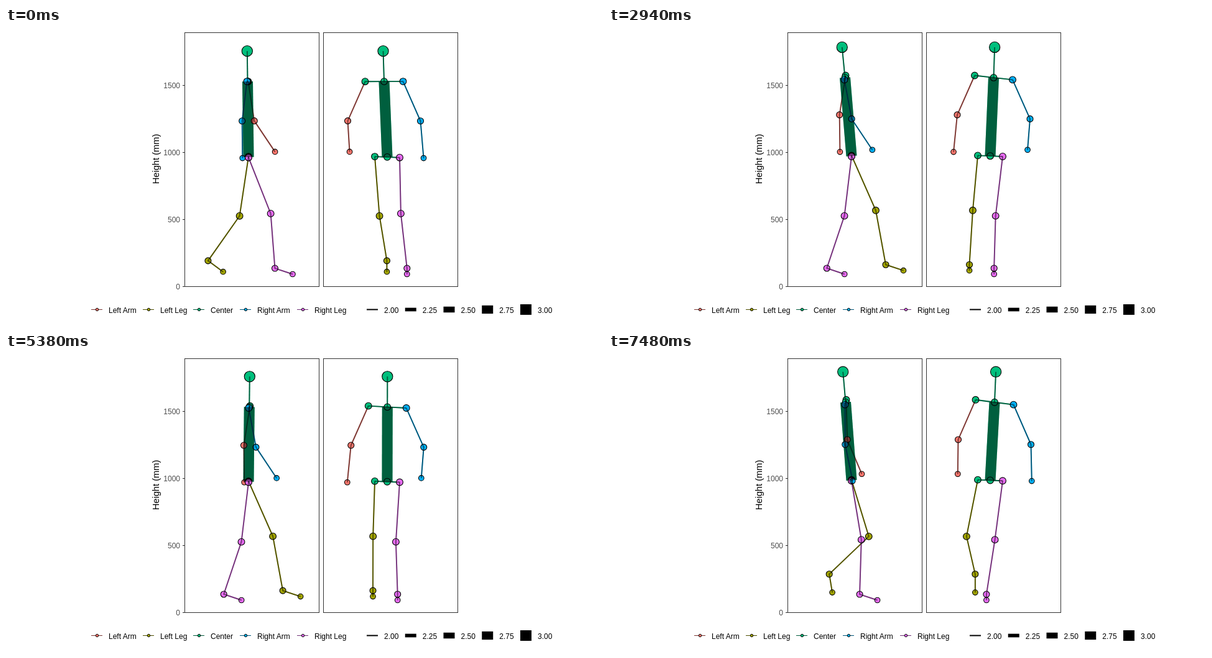
Animation of 960x480 px, one loop 7.5 s. Source, as an HTML page with a canvas:

```html
<!DOCTYPE html>
<html lang="en">
<head>
<meta charset="utf-8">
<title>Walking figure</title>
<style>
  html, body { margin: 0; width: 100%; height: 100%; overflow: hidden; background: #fff; }
  svg, canvas { position: absolute; left: 0; top: 0; width: 960px; height: 480px; }
  text { font: 12px "Liberation Sans", Arial, sans-serif; }
  .axis text { fill: #4d4d4d; text-anchor: end; }
  .frame { fill: none; stroke: #333; }
</style>
</head>
<body>
<svg viewBox="0 0 960 480">
  <rect class="frame" x="287.5" y="7.5" width="216" height="409"/>
  <rect class="frame" x="510.5" y="7.5" width="216" height="409"/>
  <text x="246" y="211" text-anchor="middle" transform="rotate(-90 246 211)" style="font-size:14.67px">Height (mm)</text>
  <g class="axis" id="axis"></g>
  <g id="legend"></g>
</svg>
<canvas id="figure" width="960" height="480"></canvas>
<script>
const LOOP = 7500, STEP = 20;
const SIDE_X = 390, FRONT_X = 613, GROUND = 396.5;
const COLORS = { lArm: '#F8766D', lLeg: '#A3A500', mid: '#00BF7D', rArm: '#00B0F6', rLeg: '#E76BF3' };

// ---- axis and legend ----
const axis = document.getElementById('axis'), legend = document.getElementById('legend');
for (let i = 0; i < 4; i++) {
  const y = 416.5 - 108 * i;
  axis.innerHTML += `<path d="M284 ${y}h3.5" stroke="#333"/><text x="280" y="${y + 4.5}">${500 * i}</text>`;
}
const addGroup = (x, label, color) => {
  const line = `M${x - 9} 453.5h18`;
  legend.innerHTML += `<path d="${line}" stroke="${color}"/><path d="${line}" stroke="#000" opacity=".5"/>
    <circle cx="${x + .5}" cy="453.5" r="2.2" fill="${color}" stroke="#000"/><text x="${x + 19}" y="459">${label}</text>`;
};
addGroup(146, 'Left Arm', COLORS.lArm);
addGroup(229, 'Left Leg', COLORS.lLeg);
addGroup(310, 'Center', COLORS.mid);
addGroup(385, 'Right Arm', COLORS.rArm);
addGroup(477, 'Right Leg', COLORS.rLeg);
for (let i = 0; i < 5; i++) {
  const x = 580 + 61.75 * i, h = 2 + 3.75 * i;
  legend.innerHTML += `<rect x="${x}" y="${453.5 - h / 2}" width="18" height="${h}"/>
    <text x="${x + 28}" y="459">${(2 + i / 4).toFixed(2)}</text>`;
}

// ---- pace and posture: time, strides walked, forward lean, sideways sway ----
const PACE = [
  [0, .10, -1.5, -5], [1660, 1.38, -5, 4.5], [2940, 2.48, -10.5, 5.5], [3760, 3.15, -3, 11.5],
  [4660, 3.89, 2.5, 4.5], [6100, 5.07, 0, -4], [7480, 6.24, -9.5, 7]
];
function paceAt(t) {
  const i = Math.max(1, PACE.findIndex(p => p[0] >= t));
  const a = PACE[i - 1], b = PACE[i], u = (t - a[0]) / (b[0] - a[0]);
  const ease = u * u * (3 - 2 * u), mix = (k, f) => a[k] + (b[k] - a[k]) * f;
  return { phase: mix(1, u), lean: mix(2, ease), sway: mix(3, ease) };
}

// ---- gait: every angle is a short Fourier series over one stride ----
function wave(phase, mean, ...harmonics) {
  return harmonics.reduce((sum, [c, s], i) => {
    const a = 2 * Math.PI * (i + 1) * phase;
    return sum + c * Math.cos(a) + s * Math.sin(a);
  }, mean);
}

// Joints are [side x, front x, y]. The angle swings forward from straight down.
function bone([x, f, y], frontX, angle, length) {
  const reach = Math.sqrt(length ** 2 - (frontX - f) ** 2);
  return [x + reach * Math.sin(angle), frontX, y + reach * Math.cos(angle)];
}

function makeLeg(sign, phase, sway, hipY) {
  const thigh = wave(phase, .185, [.285, -.031], [-.053, -.058], [0, .053]);
  const shin = wave(phase, -.286, [.251, .333], [.18, 0], [.03, -.047], [.046, 0]);
  const lifted = (phase % 1 - .71) / .095;
  const pitch = .32 + 1.2 * Math.exp(-lifted * lifted);
  const kneeOut = wave(phase, 20.4, [4.9, -10.6], [-2.75, -2.5]);
  const ankleOut = wave(phase, 14.5, [6, -5.5], [5.5, 0]);

  const hip = [SIDE_X, FRONT_X + 20 * sign, hipY + .8 * sign];
  const knee = bone(hip, FRONT_X + kneeOut * sign + 2 - sway, thigh, 97);
  const ankle = bone(knee, FRONT_X + ankleOut * sign + 4 - 2 * sway, shin, 89);
  const toe = bone(ankle, ankle[1], Math.PI / 2 - pitch, 30);
  return [hip, knee, ankle, toe];
}

function makeArm(sign, phase, sway, neck) {
  const upper = wave(phase, .015, [-.17, 0]);
  const lower = wave(phase, .3, [-.3, -.08]);
  const shoulder = [neck[0] - sign, neck[1] + 30.5 * sign, neck[2] + (1.6 + .33 * sway) * sign];
  const elbow = bone(shoulder, shoulder[1] + 28 * sign, upper, 70);
  const hand = bone(elbow, elbow[1] + wave(phase, 1, [5, 0]) * sign, lower, 60);
  return [shoulder, elbow, hand];
}

function bodyAt(t) {
  const { phase, lean, sway } = paceAt(t);
  const leftPhase = phase + .5;
  const legs = y => [makeLeg(-1, leftPhase, sway, y), makeLeg(1, phase, sway, y)];
  // The lower foot stands on the ground.
  const hipY = GROUND - Math.max(...legs(0).map(leg => leg[3][2]));
  const [lLeg, rLeg] = legs(hipY);
  const pelvis = [SIDE_X, FRONT_X, hipY];
  const neck = [SIDE_X + lean, FRONT_X + sway, hipY - 121 + .5 * lean];
  const head = [neck[0] + .45 * lean, neck[1] + .3 * sway, neck[2] - 49];
  return {
    head, neck, pelvis, lLeg, rLeg,
    lArm: makeArm(-1, leftPhase, sway, neck),
    rArm: makeArm(1, phase, sway, neck)
  };
}

// ---- drawing ----
const ctx = document.getElementById('figure').getContext('2d');

function drawView(body, column) {
  const { head, neck, pelvis, lArm, rArm, lLeg, rLeg } = body;
  const at = p => [p[column], p[2]];
  const lines = [
    [COLORS.lArm, 1.9, lArm], [COLORS.lLeg, 1.9, lLeg],
    [COLORS.mid, 1.9, [head, neck]], [COLORS.mid, 17, [neck, pelvis]],
    [COLORS.mid, 1.9, [lArm[0], neck, rArm[0]]], [COLORS.mid, 1.9, [lLeg[0], pelvis, rLeg[0]]],
    [COLORS.rArm, 1.9, rArm], [COLORS.rLeg, 1.9, rLeg]
  ];
  const strokeAll = tint => lines.forEach(([color, width, points]) => {
    ctx.beginPath();
    points.forEach(p => ctx.lineTo(...at(p)));
    ctx.strokeStyle = tint || color;
    ctx.lineWidth = width;
    ctx.stroke();
  });
  const dot = (p, radius, color) => {
    ctx.beginPath();
    ctx.arc(...at(p), radius, 0, 7);
    ctx.fillStyle = color;
    ctx.fill();
    ctx.strokeStyle = '#000';
    ctx.lineWidth = 1.1;
    ctx.stroke();
  };
  const limbDots = ([, elbow, hand], [, knee, ankle, toe], armColor, legColor) => {
    dot(elbow, 5, armColor);
    dot(hand, 4.3, armColor);
    dot(knee, 5.4, legColor);
    dot(ankle, 5, legColor);
    dot(toe, 4.3, legColor);
  };

  strokeAll();
  limbDots(lArm, lLeg, COLORS.lArm, COLORS.lLeg);
  dot(head, 8.6, COLORS.mid);
  [lArm[0], neck, lLeg[0], pelvis].forEach(p => dot(p, 5.4, COLORS.mid));
  dot(rArm[0], 5.4, COLORS.rArm);
  dot(rLeg[0], 5.4, COLORS.rLeg);
  limbDots(rArm, rLeg, COLORS.rArm, COLORS.rLeg);
  strokeAll('rgba(0,0,0,.5)');
}

const start = performance.now();
function frame() {
  const t = Math.floor((performance.now() - start) % LOOP / STEP) * STEP;
  const body = bodyAt(t);
  ctx.clearRect(0, 0, 960, 480);
  drawView(body, 0);
  drawView(body, 1);
  requestAnimationFrame(frame);
}
frame();
</script>
</body>
</html>
```
